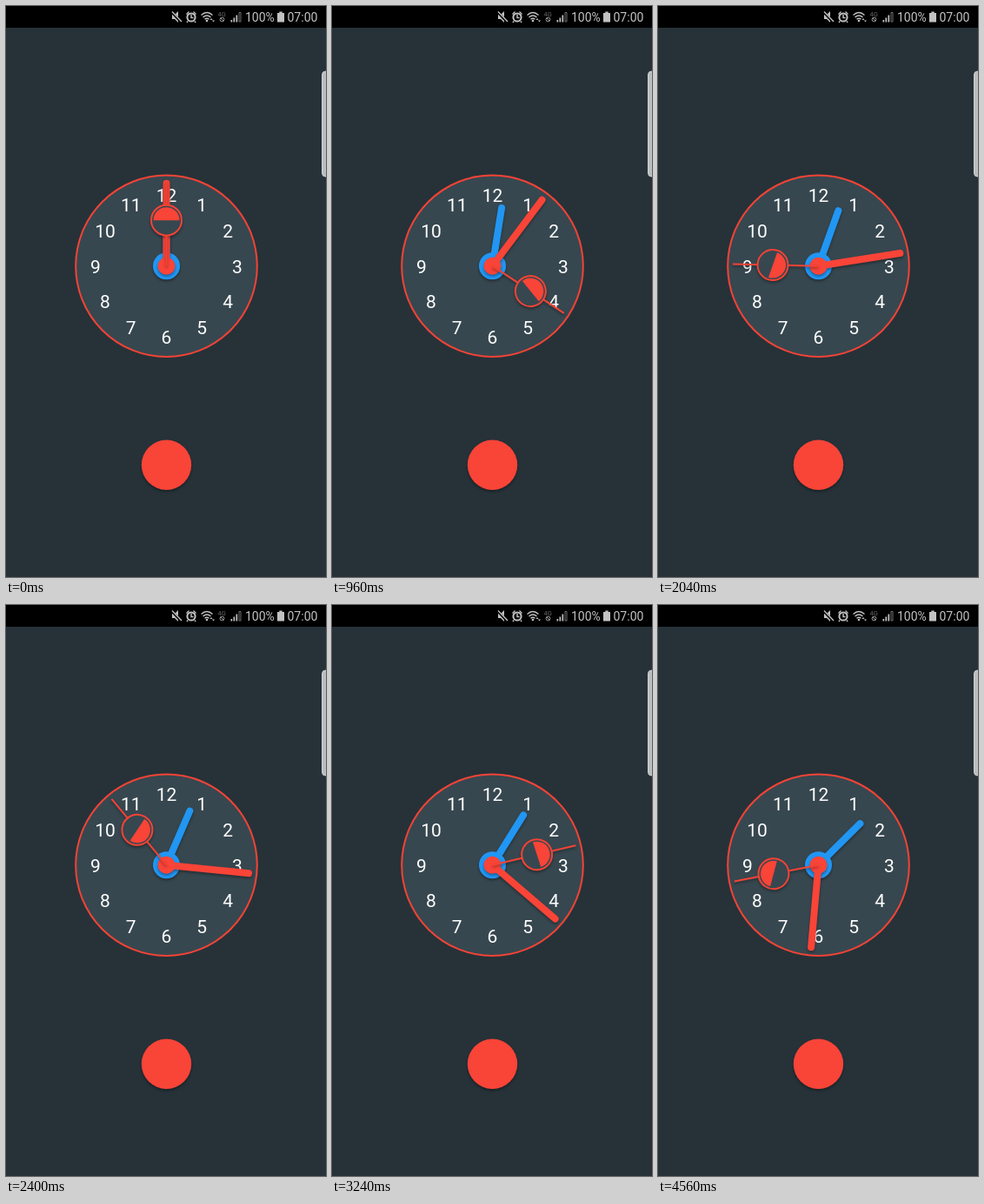
These frames come from a looping animation (368x656 px, 4.68 s). An HTML page:

```html
<!DOCTYPE html>
<html lang="en">
<head>
<meta charset="utf-8">
<title>Clock</title>
<style>
  html, body { margin: 0; width: 100%; height: 100%; overflow: hidden; background: #263238; }
  svg { display: block; width: 368px; height: 656px; font-family: Roboto, sans-serif; }
  .lift { filter: drop-shadow(0 2px 1.5px rgba(0, 0, 0, .35)); }
  .hand { stroke-width: 8; stroke-linecap: round; }
</style>
</head>
<body>
<svg viewBox="0 0 368 656">
  <rect width="368" height="656" fill="#263238"/>

  <!-- status bar -->
  <rect width="368" height="25" fill="#000"/>
  <g fill="#c2c2c2" font-size="14">
    <text x="275" y="18">100%</text>
    <text x="323.5" y="18">07:00</text>
    <path d="M191 10h3l4-4v13l-4-4h-3z"/>
    <path d="M190.500 7l11 11.500" stroke="#000" stroke-width="3"/>
    <path d="M191 6.500l11 11.500" stroke="#c2c2c2" stroke-width="1.300"/>
    <circle cx="213" cy="13" r="4.600" fill="none" stroke="#c2c2c2" stroke-width="2"/>
    <path d="M213 10v3.500h2.500M207.500 9.500l3-3M218.500 9.500l-3-3M209 17.500l-1 1.500M217 17.500l1 1.500" fill="none" stroke="#c2c2c2" stroke-width="1.400"/>
    <path d="M224.500 10.500q6.500-6 13 0M226.500 13q4.500-4 9 0M228.500 15.300q2.500-2 5 0" fill="none" stroke="#c2c2c2" stroke-width="1.400"/>
    <circle cx="231" cy="17" r="1.300"/>
    <path d="M234.500 16l1.500-2 1.500 2zM237 16.500h3l-1.500 2z"/>
    <text x="243.500" y="11.500" font-size="7.500" fill="#666">4G</text>
    <circle cx="248.500" cy="15.500" r="2.400" fill="none" stroke="#999"/>
    <path d="M247 14l3 3" stroke="#999"/>
    <path d="M258.500 16h1.700v2.500h-1.700zM261.500 13.500h1.700v5h-1.700zM264.500 10.500h1.700v8h-1.700z"/>
    <path d="M268 7.500h2v10.500h-2z" fill="none" stroke="#888" stroke-width=".8"/>
    <path d="M314.300 6.500h3.400v1.500h2.300v10.500h-8v-10.500h2.300z"/>
  </g>

  <rect x="363.500" y="75" width="12" height="121" rx="4" fill="#b9bdbf" stroke="#cfd2d3"/>

  <circle class="lift" cx="184.500" cy="527.300" r="28.700" fill="#f94438"/>

  <g transform="translate(184.500 298.700)">
    <circle r="104.300" fill="#37474f" stroke="#f44336" stroke-width="2"/>
    <g id="numbers" fill="#fff" font-size="21" text-anchor="middle"></g>
    <g class="lift" fill="#2196f3" stroke="#2196f3">
      <path id="hour" class="hand" d="M0 0V-67.500"/>
      <circle r="15.500" stroke="none"/>
    </g>
    <g class="lift" fill="#f94438" stroke="#f94438">
      <path id="minute" class="hand" d="M0 0V-95"/>
      <circle r="10" stroke="none"/>
    </g>
    <g class="lift">
      <g id="second">
        <path d="M0 0V-98.500" stroke="#f44336" stroke-width="2"/>
        <circle cy="-52.500" r="17.500" fill="#37474f" stroke="#f44336" stroke-width="2"/>
        <path id="dial" d="M-15-52.500a15 15 0 0 1 30 0z" fill="#f94438"/>
      </g>
    </g>
  </g>
</svg>
<script>
  const LOOP = 4680, STEP = 120;
  // [time in ms, second-hand angle in degrees]; the other parts are geared to it
  const keys = [[0, 0], [960, 123.4], [1560, 203.6], [2040, 271.3], [2760, 369.2],
                [3840, 521.3], [4560, 619], [4680, 635.3]];
  const el = id => document.getElementById(id);
  const turn = (id, deg, y = 0) => el(id).setAttribute('transform', `rotate(${deg} 0 ${y})`);

  for (let n = 1; n <= 12; n++) {
    const a = n * Math.PI / 6;
    el('numbers').innerHTML +=
      `<text x="${81.5 * Math.sin(a)}" y="${7.8 - 81.5 * Math.cos(a)}">${n}</text>`;
  }

  function angleAt(t) {
    const i = keys.findIndex(k => k[0] > t);
    const [t0, a0] = keys[i - 1], [t1, a1] = keys[i];
    return a0 + (a1 - a0) * (t - t0) / (t1 - t0);
  }

  const start = performance.now();
  function draw() {
    const t = (performance.now() - start) % LOOP;
    const a = angleAt(Math.floor(t / STEP) * STEP);
    turn('hour', a * 0.073);
    turn('minute', a * 0.299);
    turn('second', a);
    turn('dial', a * 14, -52.5);
    requestAnimationFrame(draw);
  }
  draw();
</script>
</body>
</html>
```
